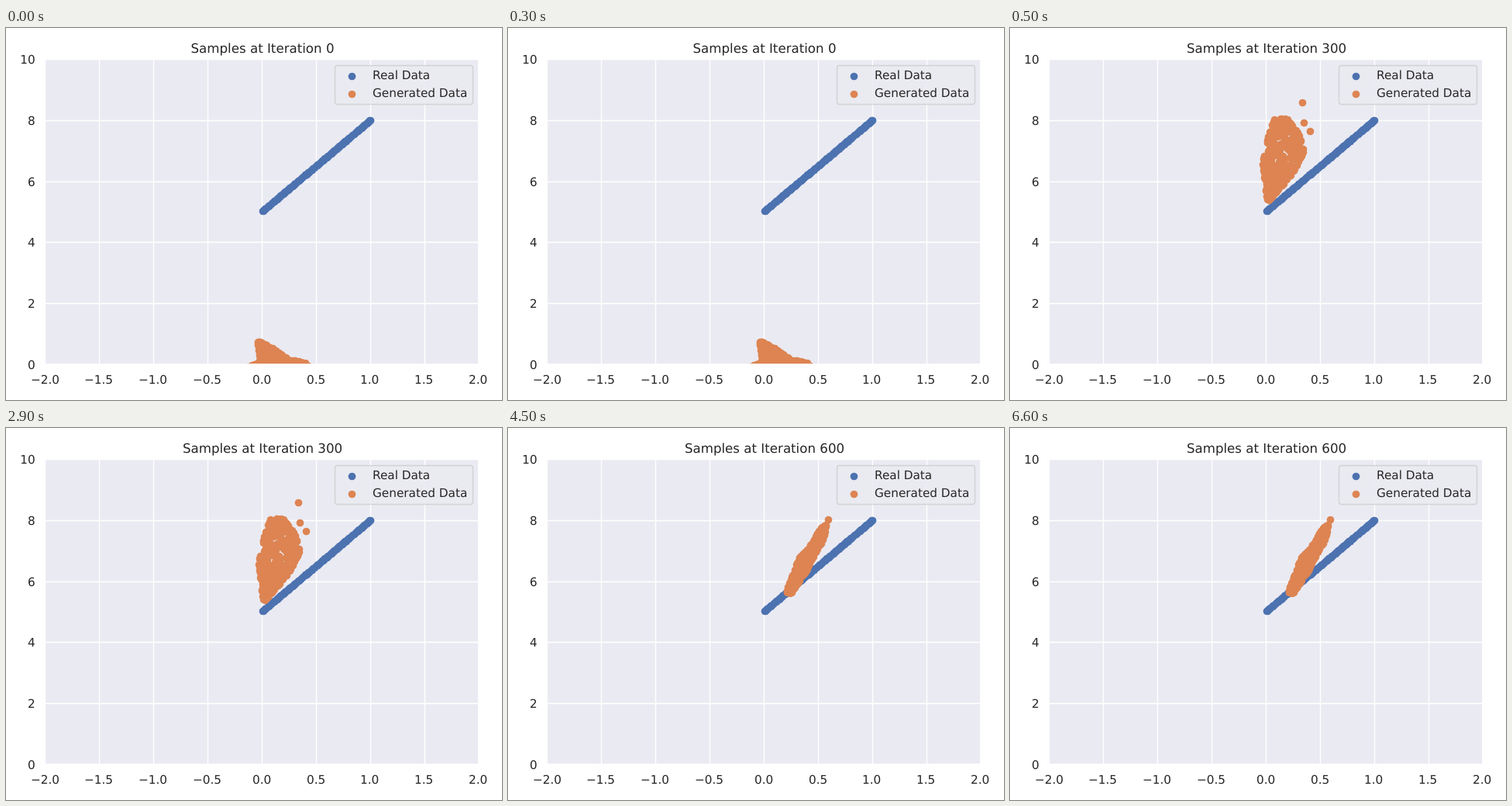
These frames come from a looping animation (640x480 px, 8 s). An HTML page:

```html
<!DOCTYPE html>
<html lang="en">
<head>
<meta charset="utf-8">
<title>Generated samples</title>
<style>
  html, body { margin: 0; width: 100%; height: 100%; overflow: hidden; background: #fff; }
  svg { display: block; width: 640px; height: 480px; }
  text { font: 15.28px "DejaVu Sans", sans-serif; fill: #262626; text-rendering: geometricPrecision; }
  #title { font-size: 16.67px; text-anchor: middle; }
  .end { text-anchor: end; }
  #grid { stroke: #fff; stroke-width: 1.39; }
  .samples { stroke-width: 9.72; stroke-linecap: round; }
  .real { stroke: #4c72b0; }
  .generated { stroke: #dd8452; }
</style>
</head>
<body>
<svg viewBox="0 0 640 480">
  <clipPath id="plot"><rect x="50.4" y="40.4" width="559.4" height="393.2"/></clipPath>
  <rect x="50" y="40" width="560" height="394" fill="#eaeaf2"/>
  <g id="grid"></g>
  <g clip-path="url(#plot)">
    <path id="real" class="samples real"/>
    <path id="generated" class="samples generated"/>
  </g>
  <rect x="50" y="40" width="560" height="394" fill="none" stroke="#fff" stroke-width="1.74"/>
  <g id="labels"></g>
  <text id="title" x="331" y="32"></text>
  <rect x="424.5" y="48.5" width="178" height="50" rx="3" fill="#eaeaf2" fill-opacity=".8" stroke="#ccc" stroke-opacity=".8" stroke-width="1.39"/>
  <path class="samples real" d="M446.5 62.5h0"/>
  <path class="samples generated" d="M446.5 85.5h0"/>
  <text x="473" y="66">Real Data</text>
  <text x="473" y="89">Generated Data</text>
</svg>
<script>
const byId = id => document.getElementById(id);
const plotX = value => 330.1 + value * 139.85;
const plotY = value => 433.6 - value * 39.32;
const snap = pixel => Math.round(pixel) + 0.5;
const dot = (x, y) => `M${snap(x)} ${snap(y)}h0`;

let seed = 7;
const random = () => (seed = seed * 16807 % 2147483647) / 2147483647;
const scatter = (count, sample) => Array.from({ length: count }, sample).join('');

// Axes
let grid = '', labels = '';
for (let x = -2; x <= 2; x += 0.5) {
  const halfWidth = x < 0 ? 18.9 : 12.5;
  grid += `<path d="M${snap(plotX(x))} 40V434"/>`;
  labels += `<text x="${Math.round(plotX(x) - halfWidth)}" y="459">${x.toFixed(1).replace('-', '−')}</text>`;
}
for (let y = 0; y <= 10; y += 2) {
  grid += `<path d="M50 ${snap(plotY(y))}H610"/>`;
  labels += `<text class="end" x="37.8" y="${Math.round(plotY(y) + 6)}">${y}</text>`;
}
byId('grid').innerHTML = grid;
byId('labels').innerHTML = labels;

// Real samples lie on y = 3x + 5
const realDot = x => dot(plotX(x), plotY(3 * x + 5));
byId('real').setAttribute('d',
  realDot(0.01) + realDot(1) + scatter(300, () => realDot(0.01 + 0.99 * random())));

// Random dots between the left and right edges of a shape given by [y, left, right] sections
function cloud(...sections) {
  const top = sections[0][0], bottom = sections.at(-1)[0];
  return scatter(320, () => {
    const y = top + (bottom - top) * random();
    const next = Math.max(1, sections.findIndex(section => section[0] >= y));
    const [y0, left0, right0] = sections[next - 1];
    const [y1, left1, right1] = sections[next];
    const mix = (y - y0) / (y1 - y0);
    const left = left0 + (left1 - left0) * mix;
    const right = right0 + (right1 - right0) * mix;
    const across = (1 - Math.cos(Math.PI * random())) / 2;  // favours the edges
    return dot(left + (right - left) * across, y);
  });
}

const stages = [
  { start: 0, iteration: 0,
    dots: cloud([405, 325, 328], [415, 326, 347], [427, 328, 363], [432, 325, 386], [440, 306, 394]) },
  { start: 500, iteration: 300,
    dots: cloud([117, 341, 358], [138, 334, 373], [157, 329, 379], [172, 326, 373], [192, 328, 361], [222, 332, 334])
      + dot(377, 96) + dot(379, 122) + dot(387, 133) },
  { start: 4500, iteration: 600,
    dots: cloud([125, 409, 410], [131, 402, 410], [150, 391, 404], [170, 374, 391], [186, 369, 384], [205, 361, 370], [213, 359, 365])
      + dot(413, 118) }
];

let shown;
function draw(elapsed) {
  const time = elapsed % 8000;
  const stage = stages.findLast(({ start }) => time >= start);
  if (stage === shown) return;
  shown = stage;
  byId('generated').setAttribute('d', stage.dots);
  byId('title').textContent = `Samples at Iteration ${stage.iteration}`;
}
const begin = performance.now();
function tick() {
  draw(performance.now() - begin);
  requestAnimationFrame(tick);
}
tick();
</script>
</body>
</html>
```
